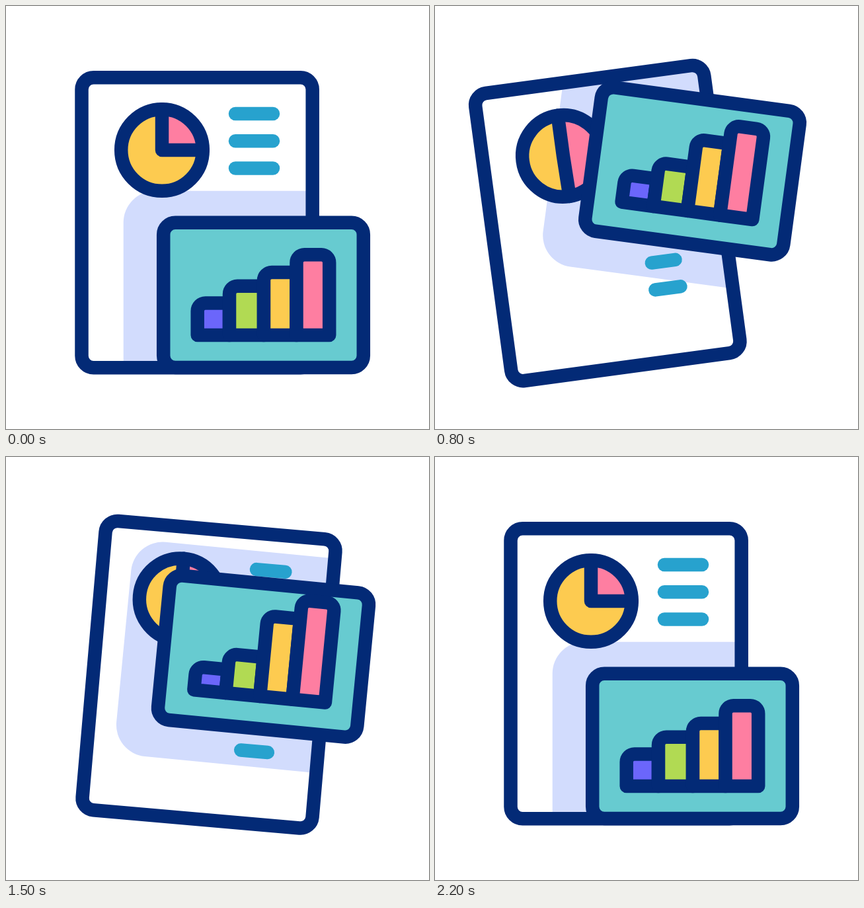
These frames come from a looping animation (640 by 640 pixels, 2220 ms). An HTML page with a canvas:

```html
<!DOCTYPE html>
<html lang="en">
<head>
<meta charset="utf-8">
<title>Report and chart</title>
<style>
html, body { margin: 0; width: 100%; height: 100%; overflow: hidden; background: #fff; }
canvas { display: block; width: 640px; height: 640px; }
</style>
</head>
<body>
<canvas id="stage" width="640" height="640"></canvas>
<script>
const ctx = document.getElementById('stage').getContext('2d');
const LOOP = 2220, STEP = 20, STROKE = 20.5;
const NAVY = '#032a76', TEAL = '#67cbd0', YELLOW = '#fdcb50', PINK = '#fe7ea1',
      BLUE = '#27a2ce', SHADE = '#d2dcfd';
const PAGE_PIVOT = [281, 535], CARD_CENTER = [389.5, 437.4];
const RISE = 221, TILT = 9;

// Left, right, top, amount of growth, colour
const BARS = [
  [289.7, 338, 449.5, -14, '#6b66fb'],
  [338, 390, 423.8, -16, '#b1da53'],
  [390, 439.5, 403, 29, YELLOW],
  [439.5, 489.2, 376.2, 31, PINK]
];

const pageTilt = [[0, 0], [733, -8], [1467, 5], [2200, 0]];
const cardRise = [[0, 0], [1060, 1], [2100, 0]];
const barGrowth = [[0, 0], [530, 1], [1060, 0], [1580, 1], [2100, 0]];
const sliceAngle = [[0, 90], [733, 180], [1690, 90]];
const lineTrim = [[0, 0], [480, 5], [800, 21], [1000, 43.5], [1085, 47.5],
                  [1320, 24], [1660, 9.5], [2160, 0]];

const rad = deg => deg * Math.PI / 180;

// Eases in and out between neighbouring keys.
function eased(keys, t) {
  const i = keys.findIndex(key => key[0] > t);
  if (i < 0) return keys[keys.length - 1][1];
  const [t0, a] = keys[i - 1], [t1, b] = keys[i];
  const u = (t - t0) / (t1 - t0);
  return a + (b - a) * u * u * (3 - 2 * u);
}

// Smooth curve through the keys, flat at ends and extremes.
function curve(keys, t) {
  const last = keys.length - 1;
  if (t <= keys[0][0]) return keys[0][1];
  if (t >= keys[last][0]) return keys[last][1];
  const slope = i => {
    if (i === 0 || i === last) return 0;
    const [p, k, n] = [keys[i - 1], keys[i], keys[i + 1]];
    return (k[1] - p[1]) * (n[1] - k[1]) <= 0 ? 0 : (n[1] - p[1]) / (n[0] - p[0]);
  };
  const i = keys.findIndex(key => key[0] > t) - 1;
  const [t0, a] = keys[i], [t1, b] = keys[i + 1];
  const d = t1 - t0, u = (t - t0) / d, v = 1 - u;
  return v * v * (1 + 2 * u) * a + u * u * (3 - 2 * u) * b
       + d * u * v * (v * slope(i) - u * slope(i + 1));
}

function rotated([x, y], deg, dy, draw) {
  ctx.save();
  ctx.translate(x, y + dy);
  ctx.rotate(rad(deg));
  ctx.translate(-x, -y);
  draw();
  ctx.restore();
}

function box(left, top, right, bottom, radius) {
  ctx.beginPath();
  ctx.roundRect(left, top, right - left, bottom - top, radius);
}

function fill(color) { ctx.fillStyle = color; ctx.fill(); }

function stroke(color = NAVY) {
  ctx.strokeStyle = color;
  ctx.lineWidth = STROKE;
  ctx.stroke();
}

const pageBox = () => box(114.5, 108.3, 463.7, 547.2, 18);

function drawPie(t) {
  const x = 236, y = 218, r = 61.8;
  const up = rad(-90), end = rad(eased(sliceAngle, t) - 90);
  ctx.beginPath();
  ctx.arc(x, y, r, 0, 7);
  fill(YELLOW);
  ctx.beginPath();
  ctx.moveTo(x, y);
  ctx.arc(x, y, r, up, end);
  fill(PINK);
  ctx.beginPath();
  ctx.moveTo(x, y - r);
  ctx.lineTo(x, y);
  ctx.lineTo(x + r * Math.cos(end), y + r * Math.sin(end));
  stroke();
  ctx.beginPath();
  ctx.arc(x, y, r, 0, 7);
  stroke();
}

// A second group of lines lies lower on the page, under the resting card.
function drawLines(t) {
  for (const shift of [0, 192]) {
    for (let i = 0; i < 3; i++) {
      const y = 163 + 41.2 * i + shift;
      const length = 57 - curve(lineTrim, t + 35 * (1 - i));
      ctx.beginPath();
      ctx.moveTo(347, y);
      ctx.lineTo(347 + length, y);
      stroke(BLUE);
    }
  }
}

function drawBars(t) {
  const growth = eased(barGrowth, t), bottom = 498;
  BARS.forEach(([left, right, top, amount, color], i) => {
    const y = top - amount * growth;
    box(left, y, right, bottom, [12, i === 3 ? 12 : 0, 0, 0]);
    fill(color);
    stroke();
  });
}

function drawCard(t) {
  box(238.2, 327.8, 540.8, 547.1, 18);
  fill(TEAL);
  stroke();
  drawBars(t);
}

function draw(t) {
  const tilt = eased(pageTilt, t), rise = eased(cardRise, t);
  const onPage = paint => rotated(PAGE_PIVOT, tilt, 0, paint);
  const onCard = paint => rotated(CARD_CENTER, TILT * rise, -RISE * rise, paint);

  ctx.fillStyle = '#fff';
  ctx.fillRect(0, 0, 640, 640);
  ctx.lineCap = ctx.lineJoin = 'round';

  ctx.save();
  onPage(pageBox);
  ctx.clip();
  onCard(() => { box(177.7, 279.7, 620, 605.4, 48); fill(SHADE); });
  ctx.restore();

  onPage(() => {
    drawLines(t);
    drawPie(t);
    pageBox();
    stroke();
  });
  onCard(() => drawCard(t));
}

function tick() {
  const t = performance.now() % LOOP;
  draw(Math.floor(t / STEP) * STEP);
  requestAnimationFrame(tick);
}
tick();
</script>
</body>
</html>
```
